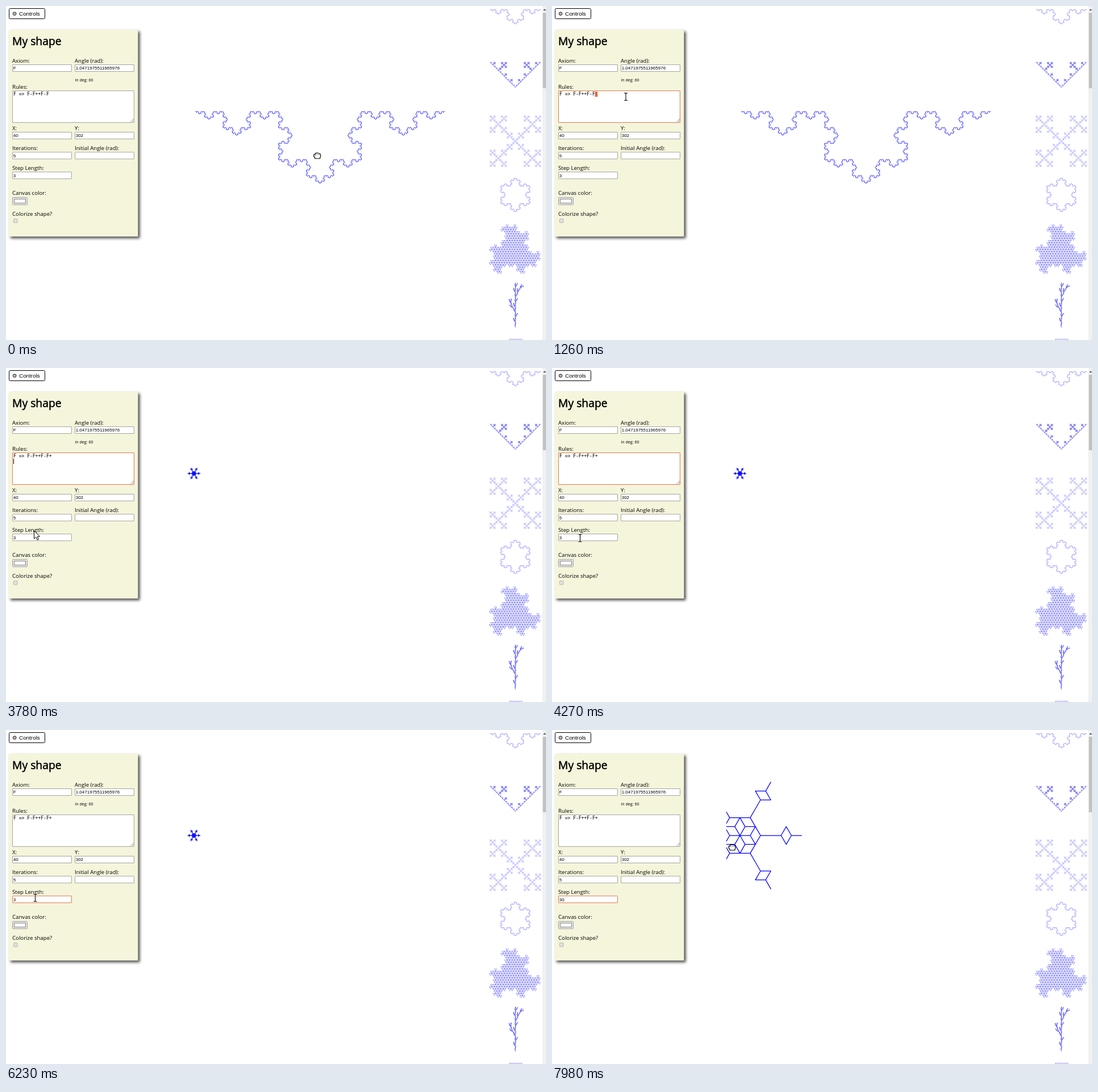
An HTML page that plays this animation: 951 px wide and 589 px high, repeating every 8 s.

```html
<!DOCTYPE html>
<html lang="en">
<head>
<meta charset="utf-8">
<title>L-system editor</title>
<style>
html, body { margin: 0; width: 100%; height: 100%; overflow: hidden; background: #fff; }
svg { display: block; width: 100vw; height: 100vh; }
.label { font: 9.64px "Open Sans", "Noto Sans", sans-serif; }
.title { font: 19.3px "Open Sans", "Noto Sans", sans-serif; stroke: #000; stroke-width: .5; }
.small { font: 7.1px "Open Sans", "Noto Sans", sans-serif; }
.field { font: 8.03px "Liberation Sans", Arial, sans-serif; }
.button { font: 9.9px "Liberation Sans", Arial, sans-serif; }
.gear { font: 9.64px "DejaVu Sans", sans-serif; }
.code { font: 8.03px "DejaVu Sans Mono", monospace; }
.box { fill: #fff; stroke: #a5a5a0; }
.box.focus { stroke: #e2774f; }
.line { fill: none; stroke: #00f; stroke-linejoin: round; }
</style>
</head>
<body>
<svg viewBox="0 0 951 589">
  <defs>
    <clipPath id="view"><rect x="307" width="540" height="589"/></clipPath>
    <path id="beam" fill="none" d="M-3 -6.500H-1L0 -5.500L1 -6.500H3M0 -5.500V5.500M-3 6.500H-1L0 5.500L1 6.500H3"/>
  </defs>
  <rect x="5.500" y="4.500" width="63" height="18" rx="2" fill="#fff" stroke="#000"/>
  <rect x="5" y="42" width="227.500" height="364.500" fill="#f5f5dc" style="filter:drop-shadow(3px 3px 2.500px #444)"/>
  <g id="form"></g>
  <path d="M219.500 204.500L225 199M222.500 204.500L225 202" stroke="#777" stroke-width=".8"/>
  <rect x="11.500" y="337.500" width="26" height="13" rx="1" fill="#e6e6e6" stroke="#a0a0a0"/>
  <rect x="14.500" y="340.500" width="20" height="7" fill="#fff" stroke="#858585"/>
  <rect x="13.500" y="375.500" width="6.500" height="6.500" rx="1" fill="#e2e2de" stroke="#b0b0ac"/>
  <g id="thumbs"></g>
  <rect x="944.500" width="7" height="589" fill="#f1f1f1"/>
  <rect x="945.500" y="12" width="6" height="133" fill="#c1c1c1"/>
  <path d="M946 8L948.500 5L951 8Z" fill="#505050"/>
  <rect id="selection" x="75.700" y="151" width="4.600" height="9" fill="#e8643c"/>
  <rect id="caret" width="1" height="9"/>
  <path id="shape" class="line" clip-path="url(#view)"/>
  <g id="cursor">
    <path id="arrow" d="M0 0V14L3.300 11L5.600 16.200L8 15.200L5.700 10.200H10Z" fill="#fff" stroke="#000"/>
    <g id="ibeam">
      <use href="#beam" stroke="#fff" stroke-width="2.400"/>
      <use href="#beam" stroke="#000" stroke-width="1.100"/>
    </g>
    <g id="hand" fill="#fff" stroke="#000" stroke-linejoin="round">
      <path d="M-4 5V3L-6 1V-1.500Q-5.500 -3 -3.500 -2.500Q-3.500 -5 -1.500 -4.500Q0 -5.500 1.200 -4.300Q3 -5 4 -3.300Q6 -3.500 6 -1V1.500L5 3.500V5Z" stroke-width="1.200"/>
      <path d="M-3.500 -2V0M-1 -2.500V-1M1.500 -2.500V-1M4 -2V-1" stroke-width=".7"/>
    </g>
  </g>
</svg>
<script>
const $ = id => document.getElementById(id);

function add(parent, tag, attrs, text) {
  const el = document.createElementNS('http://www.w3.org/2000/svg', tag);
  for (const k in attrs) el.setAttribute(k, attrs[k]);
  if (text) el.textContent = text;
  return parent.appendChild(el);
}

// Rewrites the axiom n times, then walks it as a turtle from (x, y).
function lsystem(axiom, rule, n, deg, step, x, y, dir = 0) {
  let word = axiom, d = `M${x} ${y}`;
  const saved = [];
  while (n--) word = word.replace(/F/g, rule);
  for (const c of word) {
    if (c === '-') dir += deg;
    else if (c === '+') dir -= deg;
    else if (c === '[') saved.push([x, y, dir]);
    else if (c === ']') {
      [x, y, dir] = saved.pop();
      d += `M${x} ${y}`;
    } else {
      x += step * Math.cos(dir * Math.PI / 180);
      y += step * Math.sin(dir * Math.PI / 180);
      d += `L${x.toFixed(2)} ${y.toFixed(2)}`;
    }
  }
  return d;
}

// Form: two columns of labelled inputs
const left = 11.5, right = 121.5;
const text = (cls, x, y, s) => add($('form'), 'text', { class: cls, x, y }, s);
const box = (x, y, width, height) => add($('form'), 'rect', { class: 'box', x, y, width, height, rx: .5 });
function field(x, y, label, value) {
  text('label', x - .5, y - 3.5, label);
  return { rect: box(x, y, 104, 12), value: text('field', x + 1.2, y + 8.9, value) };
}

text('gear', 11, 16.5, '⚙');
text('button', 23, 17, 'Controls');
text('title', 11, 69, 'My shape');
field(left, 103.5, 'Axiom:', 'F');
field(right, 103.5, 'Angle (rad):', '1.0471975511965976');
text('small', right, 132.5, 'in deg: 60');
text('label', 11, 145.5, 'Rules:');
const rulesBox = box(left, 149.5, 214, 56);
const rules = text('code', 13, 158.3);
field(left, 222.5, 'X:', '40');
field(right, 222.5, 'Y:', '302');
field(left, 257.8, 'Iterations:', '5');
field(right, 257.8, 'Initial Angle (rad):');
const stepField = field(left, 292.7, 'Step Length:', '3');
text('label', 11, 333.3, 'Canvas color:');
text('label', 11, 370.3, 'Colorize shape?');

// Gallery
const koch = 'F-F++F-F', quad = 'F-F+F+F-F', star = koch + '+';
const thumb = (d, width, opacity) =>
  add($('thumbs'), 'path', { class: 'line', d, 'stroke-width': width, 'stroke-opacity': opacity });

thumb(lsystem('F', koch, 5, 60, 90 / 243, 852, 6), .7, .36);
thumb(lsystem('F', quad, 4, 90, 90 / 81, 852, 99), .6, .6);
thumb(lsystem('F-F-F-F', quad, 4, 90, 90 / 81, 852, 193.5), .5, .27);
thumb(lsystem('F++F++F', koch, 4, 60, 52 / 81, 871, 348), .7, .42);
thumb(lsystem('F-F-F', 'F-F+F', 5, 120, 4.52, 934.5, 433), .8, .45);
thumb(lsystem('F', 'F[+F]F[-F]F', 3, 25.7, 79 / 27, 897, 567, -90), .8, .75);
thumb('M886 588H909', 2.5, .3).setAttribute('stroke-dasharray', '2 1');

// Main drawing at each stage of the edit
const stages = [
  { from: 0, d: lsystem('F', koch, 5, 60, 1.811, 333, 186), width: .75, rule: koch, step: 3 },
  { from: 2100, d: lsystem('F', star, 5, 60, 1.811, 331, 186), width: 1.25, rule: star, step: 3 },
  { from: 7490, d: lsystem('F', star, 5, 60, 18.11, 331, 186), width: 1.25, rule: star, step: 30 }
];

// Pointer moves: start, end, x, y
const moves = [
  [140, 420, 100, 157], [560, 770, 130, 160], [3710, 3780, 49.5, 287],
  [3780, 3990, 45, 304], [3990, 4550, 54, 296], [4900, 4970, 62, 293.5],
  [4970, 5110, 84, 296], [5110, 5250, 51.5, 296], [7420, 7980, 317, 207]
];
function pointer(t) {
  let x = 548, y = 264;
  for (const [a, b, toX, toY] of moves) {
    const u = Math.min(1, Math.max(0, (t - a) / (b - a)));
    x += (toX - x) * u;
    y += (toY - y) * u;
  }
  return [x, y];
}

const show = (el, on) => el.setAttribute('visibility', on ? 'visible' : 'hidden');
const within = (v, a, b) => v >= a && v < b;
let current;

function draw(ms) {
  const t = Math.floor(ms / 70) * 70;
  const stage = stages.filter(s => t >= s.from).pop();
  if (stage !== current) {
    current = stage;
    $('shape').setAttribute('d', stage.d);
    $('shape').setAttribute('stroke-width', stage.width);
    rules.textContent = 'F => ' + stage.rule;
    stepField.value.textContent = stage.step;
  }
  rulesBox.classList.toggle('focus', within(t, 910, 5670));
  stepField.rect.classList.toggle('focus', t >= 5670);
  show($('selection'), within(t, 1260, 2100));

  const [cx, cy] = t < 1260 ? [75.7, 151] : t < 5670 ? [13, 160] : [17, 295];
  $('caret').setAttribute('x', cx);
  $('caret').setAttribute('y', cy);
  show($('caret'), within(t, 910, 1260) || within(t, 2100, 4060) || within(t, 4620, 5110) || within(t, 5670, 6230));

  const [x, y] = pointer(t);
  const overText = within(x, 11, 226) && within(y, 149, 206) || within(x, 11, 116) && within(y, 292, 305);
  const kind = x >= 307 ? 'hand' : overText ? 'ibeam' : 'arrow';
  $('cursor').setAttribute('transform', `translate(${x} ${y})`);
  for (const id of ['arrow', 'ibeam', 'hand']) show($(id), id === kind);
}

const start = performance.now();
(function tick() {
  draw((performance.now() - start) % 8000);
  requestAnimationFrame(tick);
})();
</script>
</body>
</html>
```
